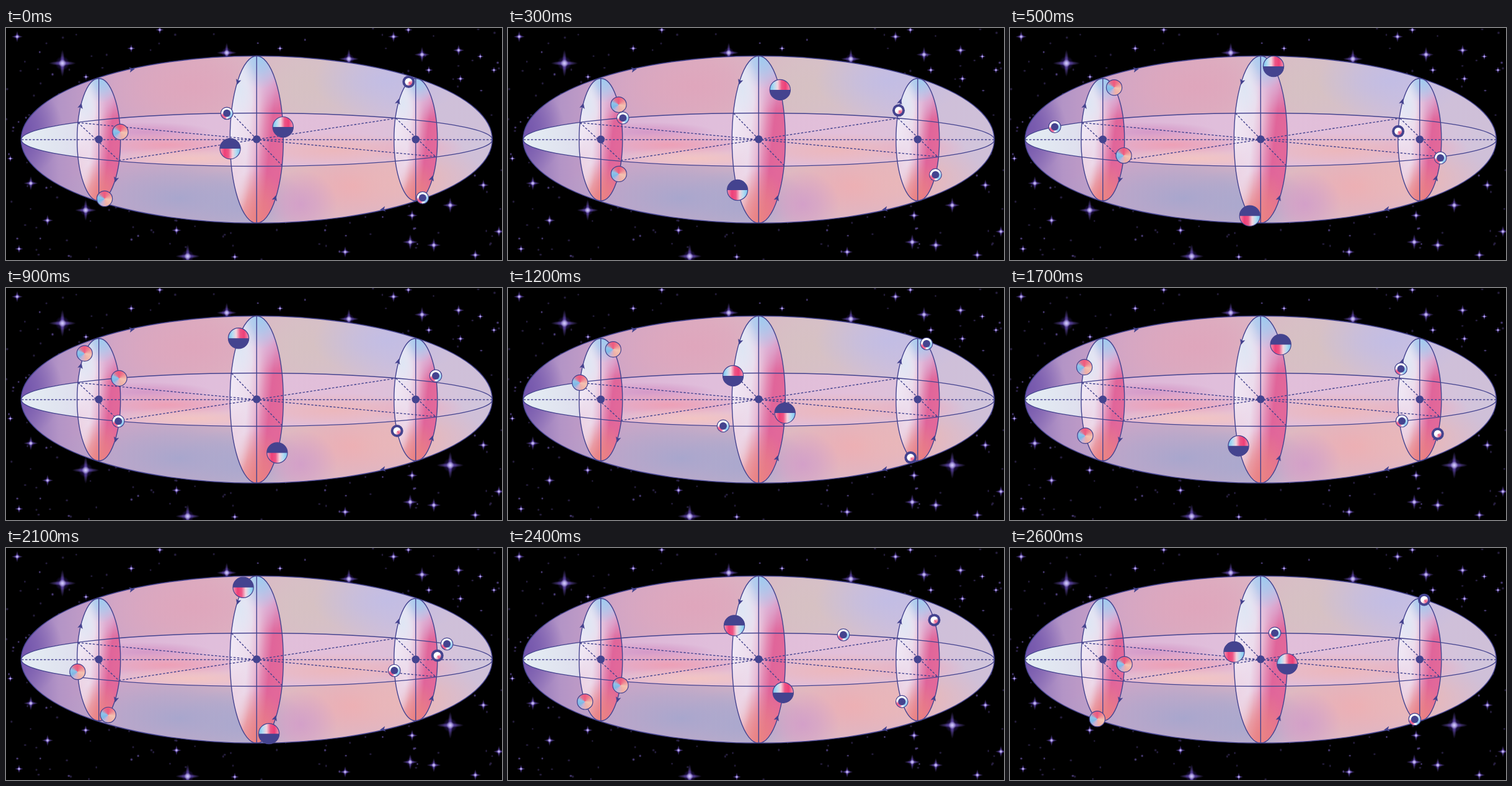
Recreate the animation shown at these times as an HTML page with a canvas. Size 800 px wide and 375 px high, loop 2700 ms.

```html
<!DOCTYPE html>
<html lang="en">
<head>
<meta charset="utf-8">
<title>Orbits</title>
<style>
  html, body { margin: 0; width: 100%; height: 100%; overflow: hidden; background: #000; }
  canvas { display: block; }
</style>
</head>
<body>
<canvas id="stage" width="800" height="375"></canvas>
<script>
const W = 800, H = 375, STEP = 100, STEPS = 27;
const INK = '#44438f', TAU = Math.PI * 2;
const ctx = document.getElementById('stage').getContext('2d');

const shell = { x: 404.3, y: 180.3, rx: 380, ry: 135 };
const flat = { x: 404.5, y: 180.5, rx: 380, ry: 43 };
const left = { x: 149.7, y: 180.5, rx: 35, ry: 99 };
const mid = { x: 404.3, y: 180.3, rx: 43, ry: 135 };
const right = { x: 660.8, y: 180.5, rx: 35, ry: 99 };

// Angles in degrees, counterclockwise, reached at these steps
const keySteps = [0, 5, 9, 12, 17, 21, 26, 27];
const balls = [
  { on: left, draw: marble, keys: [7.3, 58.4, 131, 163.9, 216, 295.5, 355.7] },
  { on: left, draw: marble, keys: [285.5, 345, 380.4, 415.2, 508, 551.4, 615.2] },
  { on: right, draw: ring, keys: [109, 172.2, 210.7, 251, 326, 363.8, 438] },
  { on: right, draw: eye, keys: [288.5, 342.7, 382.9, 426, 509.8, 550.2, 616.8] },
  { on: flat, draw: eye, keys: [97.3, 151, 234, 261.3, 306.8, 396.2, 446.6] },
  { on: mid, draw: c => half(c, 0), keys: [8.6, 61.2, 132.8, 163.5, 213.7, 297.4, 357] },
  { on: mid, draw: c => half(c, Math.PI), keys: [186.3, 246, 320.3, 350.7, 401.2, 480.3, 534.8] }
];

function pointAt(e, deg) {
  const a = deg * Math.PI / 180;
  return [e.x + e.rx * Math.cos(a), e.y - e.ry * Math.sin(a)];
}

// Arc length along the ellipse, one entry per degree, two turns
function measure(e) {
  const len = [0];
  for (let d = 1; d <= 720; d++) {
    const [x0, y0] = pointAt(e, d - 1), [x1, y1] = pointAt(e, d);
    len.push(len[d - 1] + Math.hypot(x1 - x0, y1 - y0));
  }
  return len;
}
[left, mid, right, flat].forEach(e => e.len = measure(e));

function toLength(len, deg) {
  const i = Math.floor(deg);
  return len[i] + (len[i + 1] - len[i]) * (deg - i);
}
function toAngle(len, s) {
  let i = 0;
  while (len[i + 1] < s) i++;
  return i + (s - len[i]) / (len[i + 1] - len[i]);
}
function place(ball, step) {
  const keys = [...ball.keys, ball.keys[0] + 360], len = ball.on.len;
  let i = 0;
  while (keySteps[i + 1] <= step) i++;
  const p = (step - keySteps[i]) / (keySteps[i + 1] - keySteps[i]);
  const a = toLength(len, keys[i]), b = toLength(len, keys[i + 1]);
  return pointAt(ball.on, toAngle(len, a + (b - a) * p));
}

function blob(c, x, y, rx, ry, color) {
  c.save();
  c.translate(x, y);
  c.scale(rx, ry);
  const g = c.createRadialGradient(0, 0, 0, 0, 0, 1);
  g.addColorStop(0, color);
  g.addColorStop(0.45, color + 'a0');
  g.addColorStop(1, color + '00');
  c.fillStyle = g;
  c.fillRect(-1, -1, 2, 2);
  c.restore();
}
function stops(g, list) {
  list.forEach(([at, color]) => g.addColorStop(at, color));
  return g;
}
function oval(c, e) {
  c.beginPath();
  c.ellipse(e.x, e.y, e.rx, e.ry, 0, 0, TAU);
}
function disc(c, r, fill, stroke) {
  c.beginPath();
  c.arc(0, 0, r, 0, TAU);
  c.fillStyle = fill;
  c.fill();
  if (stroke) {
    c.strokeStyle = INK;
    c.lineWidth = 1.2;
    c.stroke();
  }
}
function clipped(c, e, paint) {
  c.save();
  oval(c, e);
  c.clip();
  paint();
  c.restore();
}

function marble(c) {
  disc(c, 12.6, stops(c.createConicGradient(-Math.PI / 2, 0, 0), [
    [0, '#f0587f'], [0.12, '#ee7f8d'], [0.28, '#f3c3b2'], [0.45, '#efb0a8'],
    [0.58, '#c9b3d6'], [0.68, '#7fb9e6'], [0.8, '#8fc3ea'], [0.9, '#e0708f'], [1, '#f0587f']
  ]), true);
}
function eye(c) {
  disc(c, 9.8, stops(c.createConicGradient(0, 0, 0), [
    [0, '#a5d6f4'], [0.14, '#8cc8f0'], [0.24, '#ffffff'], [0.31, '#f06a98'],
    [0.43, '#ee5c8c'], [0.52, '#ffffff'], [0.84, '#ffffff'], [1, '#a5d6f4']
  ]), true);
  disc(c, 6, INK);
}
function ring(c) {
  disc(c, 10, INK);
  disc(c, 6, stops(c.createConicGradient(0, 0, 0), [
    [0, '#f3a0b4'], [0.14, '#ec5c88'], [0.3, '#f7d5dc'], [0.4, '#ffffff'],
    [0.9, '#ffffff'], [1, '#f3a0b4']
  ]));
}
function half(c, turn) {
  c.rotate(turn);
  disc(c, 16.6, stops(c.createLinearGradient(-16, 0, 16, 0), [
    [0, '#7cc4ee'], [0.2, '#b5dcf2'], [0.38, '#f3d3de'], [0.58, '#ee5585'],
    [0.78, '#ee3f78'], [1, '#f08fae']
  ]), true);
  c.beginPath();
  c.arc(0, 0, 16.6, 0, Math.PI);
  c.fillStyle = INK;
  c.fill();
}

function star(c, x, y, r) {
  blob(c, x, y, r * 0.62, r * 0.62, '#38207c');
  blob(c, x, y, r * 1.15, r * 0.16 + 0.8, '#6a50b8');
  blob(c, x, y, r * 0.16 + 0.8, r * 1.15, '#6a50b8');
  blob(c, x, y, r * 0.3 + 0.6, r * 0.3 + 0.6, '#d8d2ff');
}

const stars = [
  [91, 57, 19], [293, 369, 17], [671, 43, 11], [356, 40, 14], [553, 50, 14],
  [652, 346, 11], [690, 351, 10], [40, 251, 10], [67, 311, 8], [18, 14, 8],
  [202, 33, 6], [248, 3, 6], [625, 14, 8], [649, 3, 6], [730, 36, 8], [765, 46, 5],
  [733, 82, 6], [787, 68, 5], [682, 68, 6], [770, 254, 8], [795, 329, 8],
  [757, 367, 8], [547, 362, 8], [275, 327, 7], [21, 357, 6], [369, 370, 6],
  [655, 303, 8], [7, 211, 5], [129, 79, 5], [442, 33, 5]
];

function sky(c) {
  c.fillStyle = '#000';
  c.fillRect(0, 0, W, H);
  let seed = 41;
  const rnd = () => (seed = seed * 16807 % 2147483647) / 2147483647;
  for (let i = 0; i < 230; i++) {
    blob(c, rnd() * W, rnd() * H, 1.8 + rnd(), 1.8 + rnd(), rnd() < 0.3 ? '#5c4a94' : '#30264f');
  }
  stars.forEach(s => star(c, ...s));
}

function fillShell(c) {
  c.fillStyle = stops(c.createLinearGradient(24, 0, 784, 0), [
    [0, '#8468b4'], [0.08, '#b394c6'], [0.2, '#d0a5c6'], [0.4, '#dcb0c2'],
    [0.6, '#d8bfc8'], [0.8, '#cfbfda'], [1, '#cfc0d8']
  ]);
  c.fillRect(0, 0, W, H);
  blob(c, 300, 95, 150, 75, '#dfa6bc');
  blob(c, 490, 95, 130, 70, '#d6c1c3');
  blob(c, 615, 85, 120, 60, '#c2bde4');
  blob(c, 280, 275, 200, 80, '#a8a6cd');
  blob(c, 380, 285, 110, 60, '#aaa8ce');
  blob(c, 560, 255, 150, 85, '#edaeb3');
  blob(c, 475, 285, 60, 55, '#d3a0c8');
  blob(c, 655, 245, 120, 65, '#eab7b8');
  blob(c, 22, 165, 70, 75, '#7355ac');
}
function fillFlat(c) {
  c.fillStyle = stops(c.createLinearGradient(24, 0, 784, 0), [
    [0, '#e4eef4'], [0.11, '#dfe0ee'], [0.2, '#dcb4d6'], [0.4, '#e0bedb'],
    [0.7, '#e2bfd9'], [1, '#cfc5dc']
  ]);
  c.fillRect(0, 0, W, H);
  blob(c, 225, 168, 110, 16, '#d69ac8');
  blob(c, 260, 189, 130, 20, '#eda0b6');
  blob(c, 300, 211, 150, 18, '#f2c4c2');
  blob(c, 530, 198, 160, 28, '#ecb7bc');
  blob(c, 660, 195, 80, 24, '#e8afc2');
}
function fillUpright(c, e) {
  c.save();
  c.translate(e.x, e.y);
  c.scale(e.rx, e.ry);
  c.fillStyle = stops(c.createLinearGradient(-0.9, -0.25, 0.75, 0.3), [
    [0, '#f0e8f5'], [0.35, '#ecdcec'], [0.52, '#e8bcd6'], [0.68, '#e388b2'],
    [0.82, '#e0659a'], [1, '#e2689a']
  ]);
  c.fillRect(-1, -1, 2, 2);
  blob(c, 0.5, -0.85, 0.95, 0.55, '#d9b8de');
  blob(c, 0.15, -1, 0.9, 0.4, '#9ccbf0');
  blob(c, -0.6, -0.6, 0.6, 0.4, '#dfe6f4');
  blob(c, 0, 0.95, 1.2, 0.6, '#ea8382');
  blob(c, -0.85, 0.45, 0.6, 0.5, '#ecd3e4');
  c.restore();
}

function line(c, x0, y0, x1, y1) {
  c.beginPath();
  c.moveTo(x0, y0);
  c.lineTo(x1, y1);
  c.stroke();
}
function arrow(c, x, y, deg) {
  c.save();
  c.translate(x, y);
  c.rotate(deg * Math.PI / 180);
  c.beginPath();
  c.moveTo(5, 0);
  c.lineTo(-4, -4.3);
  c.lineTo(-2, 0);
  c.lineTo(-4, 4.3);
  c.fillStyle = INK;
  c.fill();
  c.restore();
}

function scene(c) {
  sky(c);
  clipped(c, shell, () => fillShell(c));
  clipped(c, flat, () => fillFlat(c));
  const uprights = [left, mid, right];
  uprights.forEach(e => clipped(c, e, () => fillUpright(c, e)));

  c.strokeStyle = INK;
  c.lineWidth = 1.4;
  [shell, flat, ...uprights].forEach(e => { oval(c, e); c.stroke(); });
  uprights.forEach(e => line(c, e.x, e.y - e.ry, e.x, e.y + e.ry));

  c.setLineDash([3.5, 2.5]);
  [
    [25, 180.5, 784, 180.5], [116, 153, 693, 208], [182, 214, 629, 146],
    [116, 153, 182, 214], [364, 138, 445, 222], [629, 146, 693, 208]
  ].forEach(p => line(c, ...p));
  c.setLineDash([]);

  [
    [203, 67, -11], [608, 293, 169], [374, 87, 107], [434, 275, -72],
    [120.5, 126, -76], [177, 245, 106], [632.5, 119, -74], [687, 243, -74]
  ].forEach(a => arrow(c, ...a));
  uprights.forEach(e => {
    c.save();
    c.translate(e.x, e.y - 0.5);
    disc(c, 6.3, INK);
    c.restore();
  });
}

const still = document.createElement('canvas');
still.width = W;
still.height = H;
scene(still.getContext('2d'));

function render(step) {
  ctx.drawImage(still, 0, 0);
  star(ctx, 128.5, 294.5, step < 7 ? 15 : step < 11 ? 19 : 7);
  star(ctx, 716.5, 286.5, step < 7 ? 11 : 19);
  balls.forEach(ball => {
    ctx.save();
    ctx.translate(...place(ball, step));
    ball.draw(ctx);
    ctx.restore();
  });
}

const start = performance.now();
function tick() {
  const t = performance.now() - start;
  render(Math.floor(t / STEP) % STEPS);
  requestAnimationFrame(tick);
}
tick();
</script>
</body>
</html>
```
